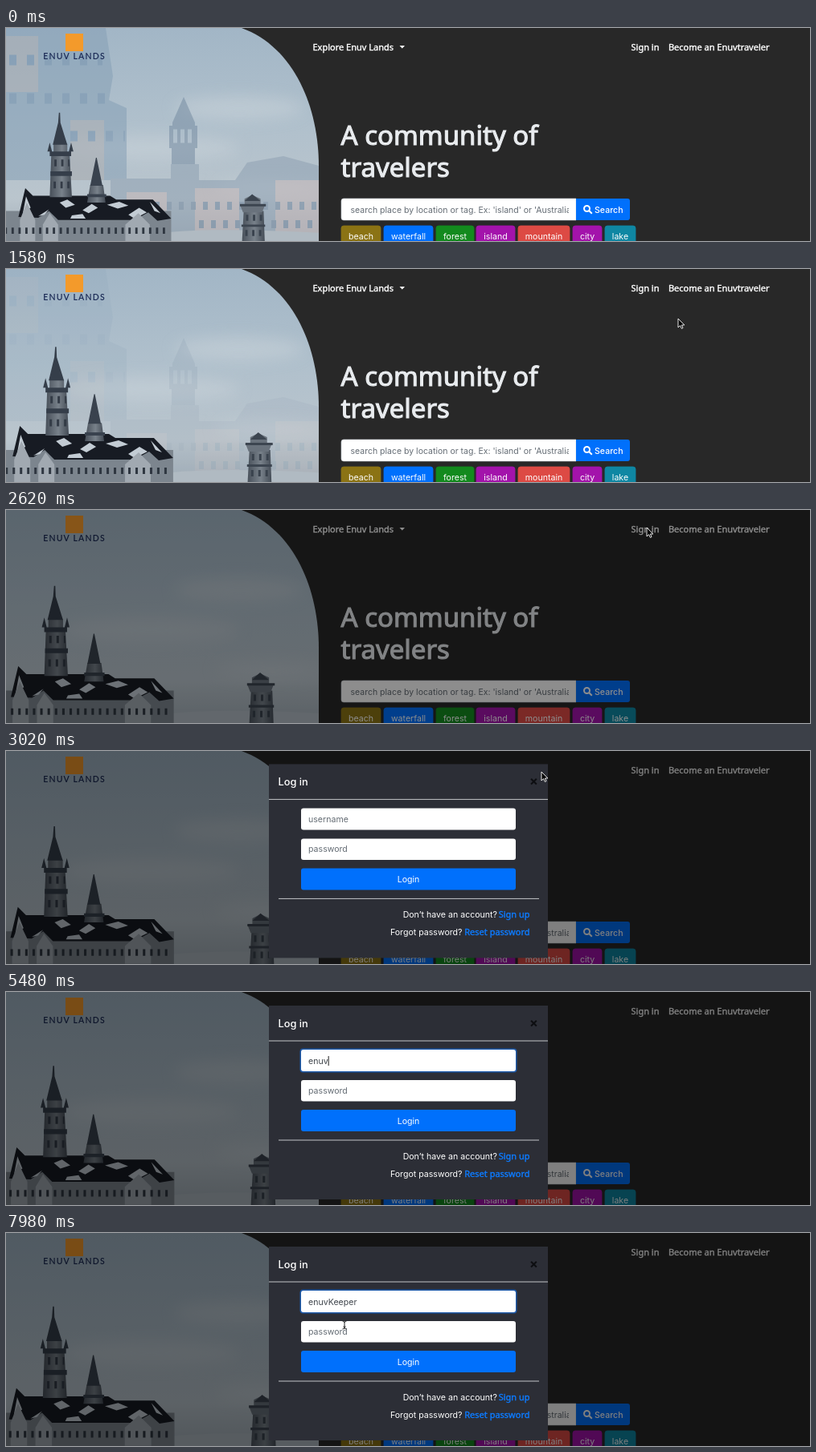
Write an HTML page that moves like this. It is 1000 px wide and 266 px high and loops after 8 s.

```html
<!DOCTYPE html>
<html lang="en">
<head>
<meta charset="utf-8">
<style>
  html, body { margin: 0; height: 100%; overflow: hidden; background: #282828; }
  svg { display: block; width: 100vw; height: 100vh; }
  text { font: 10.6px Inter, sans-serif; fill: #fff; white-space: pre; }
  .nav { font: 500 11px "Noto Sans", sans-serif; stroke: #fff; stroke-width: .4px; }
  .title { font: 500 33px "Noto Sans", sans-serif; fill: #e9ecef; stroke: #e9ecef; stroke-width: 1.1px; }
  .hint { fill: #646c74; }
  .typed { fill: #40464d; }
  .link { fill: #0d7bff; stroke: #0d7bff; }
  .end { text-anchor: end; }
  .mid { text-anchor: middle; }
</style>
</head>
<body>
<svg viewBox="0 0 1000 266">
  <defs>
    <clipPath id="panel"><path d="M0 0H293C359 24 389 100 389 172V266H0Z"/></clipPath>
    <clipPath id="inputClip"><rect x="417" y="213" width="283" height="27"/></clipPath>
    <linearGradient id="sky" x2="0" y2="1">
      <stop stop-color="#a2b6c6"/><stop offset=".45" stop-color="#b0c0cc"/>
      <stop offset=".8" stop-color="#bac5cd"/><stop offset="1" stop-color="#a3aeb7"/>
    </linearGradient>
    <linearGradient id="shaft">
      <stop stop-color="#474f59"/><stop offset=".55" stop-color="#78818a"/><stop offset="1" stop-color="#434b55"/>
    </linearGradient>
    <filter id="soft" x="-50%" y="-50%" width="200%" height="200%"><feGaussianBlur stdDeviation="9"/></filter>
    <filter id="hazy"><feGaussianBlur stdDeviation=".7"/></filter>
  </defs>
  <rect width="1000" height="266" fill="#282828"/>

  <g clip-path="url(#panel)">
    <rect width="389" height="266" fill="url(#sky)"/>
    <g filter="url(#soft)" fill="#cbd4da" opacity=".5">
      <ellipse cx="290" cy="100" rx="80" ry="15"/>
      <ellipse cx="180" cy="150" rx="110" ry="15"/>
      <ellipse cx="330" cy="200" rx="70" ry="10"/>
    </g>

    <g id="canal" filter="url(#hazy)">
      <path fill="#86a0b6" d="M0 0H124L133 60 128 90 150 100V190H0Z"/>
      <path fill="#a6a9ae" d="M0 10H40V80H0ZM80 115H122V190H80Z"/>
      <path fill="none" stroke="#6f8daa" stroke-width="13" stroke-dasharray="9 13" d="M4 40H120M4 88H125M80 135H148"/>
      <path fill="#768ca2" d="M221 86L235 118V122H238V150H235V196H206V150H203V122H207V118Z"/>
      <path fill="none" stroke="#a8bac8" stroke-width="17" stroke-dasharray="5 4" d="M208 135H234"/>
      <path fill="#8fa1b2" d="M130 188H205V170H240V190H285L300 168 345 160 389 172V266H130Z"/>
      <path fill="#c0b3b4" d="M150 205H200V250H150ZM235 200H290V266H235ZM335 190H389V266H335Z"/>
      <path fill="none" stroke="#71879e" stroke-width="10" stroke-dasharray="6 9" d="M155 222H389M240 245H389"/>
    </g>

    <g id="castle">
      <path fill="#b0bac2" d="M190 256Q260 246 420 256V280H190Z"/>
      <path fill="#7c858e" d="M-20 226H208V280H-20Z"/>
      <path fill="#171b23" d="M8 234L17 196 27 206H128L136 211H184L208 236 190 239 178 228 160 238H60L48 226 34 235Z"/>
      <path fill="#c3ccd4" d="M14 228L18 207 24 222ZM48 224L42 231 34 233ZM62 215L72 211 82 218 70 222ZM92 225L104 217 112 222 100 229ZM124 218L140 214 152 219 138 223ZM152 231L166 222 176 228 160 236ZM180 214L194 229 186 226ZM78 232L92 230 96 236H76Z"/>
      <path fill="#a1a9b1" d="M10 238L19 215 30 238V266H10ZM40 244L49 229 60 244V266H40ZM148 244L165 229 180 244V266H148Z"/>
      <path fill="none" stroke="#2f3741" stroke-width="8" stroke-dasharray="3 6" d="M-10 252H206"/>
      <path fill="url(#shaft)" d="M51 152H75L78 208H49ZM54 138H72V152H54Z"/>
      <path fill="#353e4a" d="M61 97H62.500L63 110 72 139H53L60 110ZM49 148H77V154H49ZM50 174H78V180H50ZM46 148L49 136 52 148ZM74 148L77 136 80 148Z"/>
      <path fill="none" stroke="#333b46" stroke-width="9" stroke-dasharray="3 6" d="M55 163H75M54 192H76"/>
      <path fill="url(#shaft)" d="M102 192H119L122 215H98Z"/>
      <path fill="#39424e" d="M109.500 156H110.500L118 193H102ZM98 204H123V208H98Z"/>
      <path fill="url(#shaft)" d="M303 226H329L331 280H300Z"/>
      <path fill="#69727c" d="M304 218V210L314 205 325 210V218H331L327 228H302L298 218Z"/>
      <path fill="#3c4550" d="M304 213L314 204 325 213ZM298 217H332V220H298ZM300 244H331V247H300Z"/>
      <path fill="none" stroke="#39424d" stroke-width="8" stroke-dasharray="3 6" d="M306 235H327M305 255H328"/>
    </g>
  </g>

  <rect x="74" y="7" width="22" height="22" fill="#f39a2b"/>
  <text x="85" y="39" class="mid" style="font:600 10.500px Lato,sans-serif;letter-spacing:1.200px;fill:#1b2a55">ENUV LANDS</text>

  <text x="381.500" y="28" class="nav">Explore Enuv Lands</text>
  <path d="M489.500 22H496L492.800 25.500Z" fill="#fff"/>
  <text x="777.500" y="28" class="nav">Sign in</text>
  <text x="949.500" y="28" class="nav end">Become an Enuvtraveler</text>
  <text x="416.500" y="146" class="title">A community of</text>
  <text x="416.500" y="186" class="title">travelers</text>

  <path d="M420 213H709V240H420Q417 240 417 237V216Q417 213 420 213Z" fill="#fff" stroke="#ced4da" stroke-width=".6"/>
  <text x="428.500" y="231" class="hint" clip-path="url(#inputClip)" style="font-size:10.500px">search place by location or tag. Ex: 'island' or 'Australia'</text>
  <path d="M709 213H773Q776 213 776 216V237Q776 240 773 240H709Z" fill="#0070fc"/>
  <g fill="none" stroke="#fff" stroke-width="2"><circle cx="722.500" cy="225.500" r="3.500"/><path d="M725 228L728.800 231.800"/></g>
  <text x="732" y="231" style="font-weight:500">Search</text>
  <g id="tags"></g>

  <rect id="backdrop" width="1000" height="266"/>

  <g id="modal">
    <rect x="327" y="17" width="347" height="242" fill="#2c2e36"/>
    <text x="338.500" y="44" style="font-size:12.800px;font-weight:500">Log in</text>
    <text x="656.500" y="44" class="mid" style="font-size:16px;font-weight:700;fill:#0d0e11">×</text>
    <path d="M327 61H674M339 185H663" stroke="#c3c5c9"/>
    <rect id="ring" x="365.500" y="70.500" width="270" height="30" rx="4" fill="#1c58a8"/>
    <rect x="367" y="72" width="267" height="27" rx="3" fill="#fff"/>
    <text id="user" x="376" y="89.500"></text>
    <rect id="caret" y="80" width="1" height="12" fill="#222"/>
    <rect x="367" y="110" width="267" height="26.500" rx="3" fill="#fff"/>
    <text x="376" y="127" class="hint">password</text>
    <rect x="367" y="147" width="267" height="27" rx="3" fill="#0070fc"/>
    <text x="500.500" y="164.500" class="mid">Login</text>
    <text x="611" y="209" class="end">Don’t have an account?</text>
    <text x="651.500" y="209" class="nav link end">Sign up</text>
    <text x="567.500" y="231" class="end">Forgot password?</text>
    <text x="651.500" y="231" class="nav link end">Reset password</text>
  </g>

  <g id="pointer">
    <path id="arrow" d="M0 0V11L2.600 8.600 4.300 12.400 6 11.600 4.400 8H7.800Z" fill="#000" stroke="#fff" stroke-width=".9"/>
    <path id="beam" d="M-2.500 -5Q0 -5 0 -3Q0 -5 2.500 -5M0 -3V4M-2.500 5Q0 5 0 3Q0 5 2.500 5M-1.500 2H1.500" fill="none" stroke="#222"/>
  </g>
</svg>
<script>
  const $ = id => document.getElementById(id);
  const LOOP = 8000, DIM_AT = 2520, MODAL_AT = 2760, FOCUS_AT = 4250;
  const USERNAME = 'enuvKeeper';
  const KEY_TIMES = [4760, 4940, 5140, 5340, 5900, 6150, 6350, 6600, 6800, 7050];
  // Pointer stops: time, x, y
  const ENTRY = [[780, 915, 270], [1100, 929, 150], [1580, 836, 62], [2150, 797, 22],
    [2700, 797, 22], [3020, 666, 26], [3300, 640, 44], [3900, 470, 86], [4700, 470, 86]];
  const RETURN = [[7500, 405, 88], [7980, 421, 115], [8000, 421, 115]];

  const tags = [['beach', 417, 49, '#8b7314'], ['waterfall', 470, 61, '#0070fc'],
    ['forest', 535, 47, '#138a1e'], ['island', 585, 48, '#a313ab'],
    ['mountain', 637, 64, '#dd4a44'], ['city', 705, 36, '#a313ab'], ['lake', 745, 38, '#0f87a3']];
  $('tags').innerHTML = tags.map(([name, x, w, color]) =>
    `<rect x="${x}" y="247" width="${w}" height="26" rx="3" fill="${color}" stroke="${color}" stroke-width=".8"/>
     <text x="${x + w / 2}" y="264" class="mid">${name}</text>`).join('');

  const progress = (t, start, length) => Math.min(1, Math.max(0, (t - start) / length));
  const show = (id, on) => $(id).style.display = on ? '' : 'none';

  function along(stops, t) {
    const i = stops.findIndex(s => s[0] > t);
    if (i < 1) return null;
    const [a, b] = [stops[i - 1], stops[i]];
    const p = progress(t, a[0], b[0] - a[0]), k = p * p * (3 - 2 * p);
    return [a[1] + (b[1] - a[1]) * k, a[2] + (b[2] - a[2]) * k];
  }

  // The photo zooms in slowly and settles
  function drawPhoto(t) {
    const zoom = 1.03 - .08 * Math.exp(-t / 1700);
    $('castle').setAttribute('transform', `translate(157 274) scale(${zoom}) translate(-157 -274)`);
    $('canal').setAttribute('opacity', .55 * (1 - progress(t, 0, 2150)));
  }

  function drawField(t) {
    const count = KEY_TIMES.filter(k => k <= t).length;
    const user = $('user');
    user.textContent = count ? USERNAME.slice(0, count) : 'username';
    user.setAttribute('class', count ? 'typed' : 'hint');
    const lastInput = count ? KEY_TIMES[count - 1] : FOCUS_AT;
    show('ring', t >= FOCUS_AT);
    show('caret', t >= FOCUS_AT && (t - lastInput) % 1000 < 500);
    $('caret').setAttribute('x', 376 + (count ? user.getComputedTextLength() : 0));
  }

  function drawPointer(t) {
    const at = along(ENTRY, t) || along(RETURN, t);
    show('pointer', at);
    if (!at) return;
    const [x, y] = at;
    const overInput = t > MODAL_AT && x > 367 && x < 634 && (y > 72 && y < 99 || y > 110 && y < 137);
    show('beam', overInput);
    show('arrow', !overInput);
    $('pointer').setAttribute('transform', `translate(${x} ${y})`);
  }

  function draw(now) {
    const t = now % LOOP;
    drawPhoto(t);
    $('backdrop').setAttribute('opacity', .5 * (1 - (1 - progress(t, DIM_AT, 150)) ** 2));
    show('modal', t >= MODAL_AT);
    $('modal').setAttribute('opacity', progress(t, MODAL_AT, 150));
    $('modal').setAttribute('transform', `translate(0 ${-35 * (1 - progress(t, MODAL_AT, 300)) ** 2})`);
    drawField(t);
    drawPointer(t);
    requestAnimationFrame(draw);
  }
  requestAnimationFrame(draw);
</script>
</body>
</html>
```
